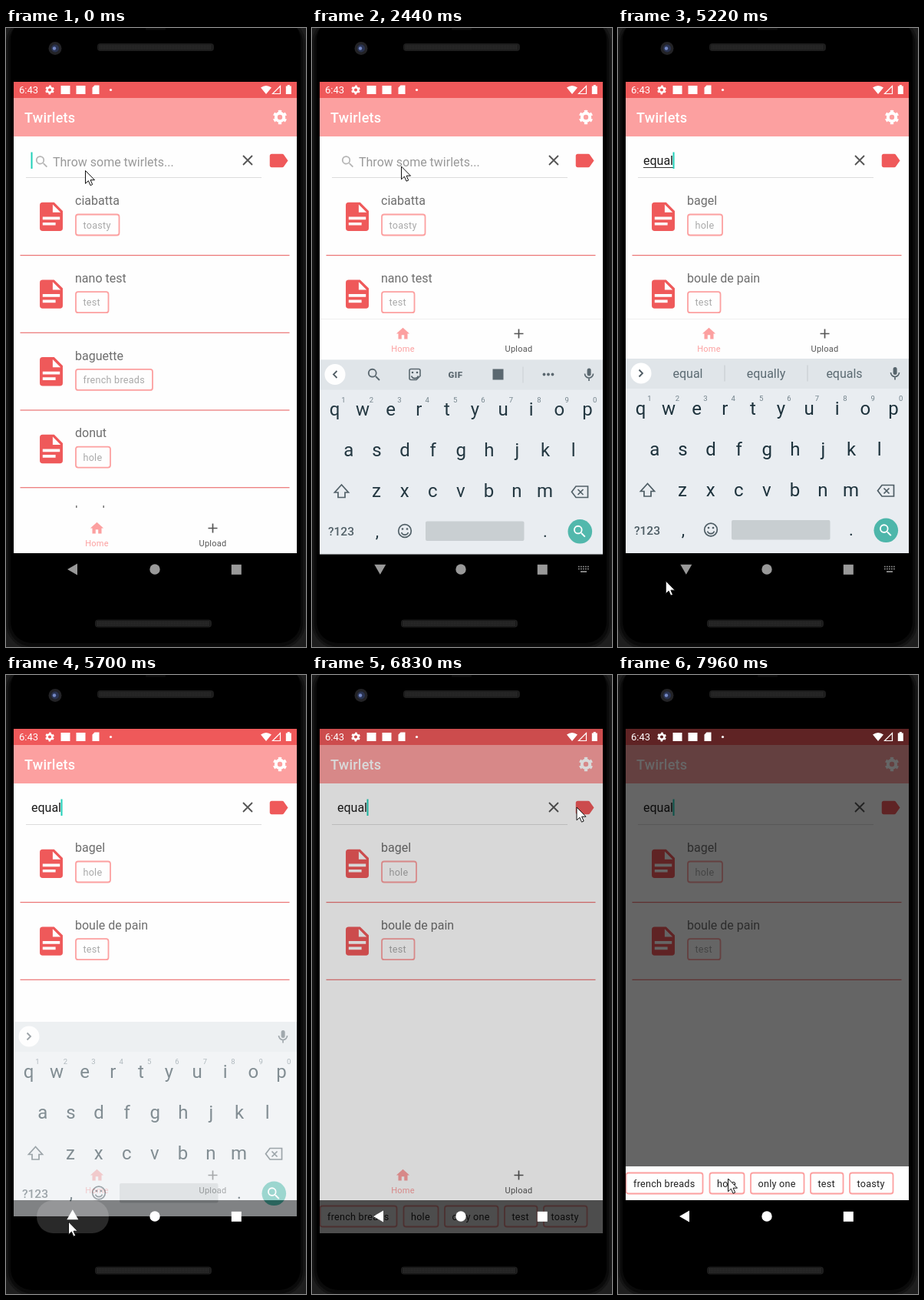
Write an HTML page that moves like this. It is 391 px wide and 805 px high and loops after 8 s.

```html
<!DOCTYPE html>
<html lang="en">
<head>
<meta charset="utf-8">
<title>Tag search on a phone</title>
<style>
  html, body { margin: 0; width: 100%; height: 100%; overflow: hidden; background: #000; }
  svg { display: block; width: 391px; height: 805px; font-family: Roboto, sans-serif; }
</style>
</head>
<body>
<svg id="stage" viewBox="0 0 391 805"></svg>
<script>
const RED = '#ef595a', PINK = '#fca0a0';
const LOOP = 8000;

const text = (x, y, size, fill, str, extra = '') =>
  `<text x="${x}" y="${y}" font-size="${size}" fill="${fill}" ${extra}>${str}</text>`;
const mid = (x, y, size, fill, str, extra = '') =>
  text(x, y, size, fill, str, `text-anchor="middle" ${extra}`);
const rect = (x, y, w, h, fill, extra = '') =>
  `<rect x="${x}" y="${y}" width="${w}" height="${h}" fill="${fill}" ${extra}/>`;
const circle = (x, y, r, fill, extra = '') =>
  `<circle cx="${x}" cy="${y}" r="${r}" fill="${fill}" ${extra}/>`;
const line = (d, color, width = 1.7, extra = '') =>
  `<path d="${d}" fill="none" stroke="${color}" stroke-width="${width}" ${extra}/>`;
// 24-unit icon centred on x, y
const icon = (d, x, y, scale, fill) =>
  `<path d="${d}" fill="${fill}" transform="translate(${x} ${y}) scale(${scale}) translate(-12 -12)"/>`;

const DOC = 'M13 9h5.5L13 3.5zM6 2h8l6 6v12a2 2 0 0 1-2 2H6a2 2 0 0 1-2-2V4a2 2 0 0 1 2-2m9 16v-2H6v2zm3-4v-2H6v2z';
const LENS = 'M15.5 14h-.8l-.3-.3A6.5 6.5 0 1 0 13.7 14.4l.3.3v.8l5 5 1.5-1.5zM9.5 14a4.5 4.5 0 1 1 0-9 4.5 4.5 0 0 1 0 9z';
const LABEL = 'M17.6 5.8C17.3 5.3 16.7 5 16 5H5C3.9 5 3 5.9 3 7v10c0 1.1.9 2 2 2h11c.7 0 1.3-.3 1.6-.8L22 12z';
const HOME = 'M10 20v-6h4v6h5v-8h3L12 3 2 12h3v8z';

const gear = (x, y, s) => `<g transform="translate(${x} ${y}) scale(${s})" fill="none" stroke="#fff">
  <circle r="5.2" stroke-width="4"/>
  <circle r="7.8" stroke-width="2.8" pathLength="12" stroke-dasharray="1 1" transform="rotate(15)"/></g>`;

const chip = (x, y, w, str, color) =>
  rect(x + 1, y + 1, w - 2, 27, 'none', `rx="3" stroke="${PINK}" stroke-width="1.8"`) +
  text(x + 10.5, y + 19, 12.6, color, str, 'letter-spacing=".25"');

const rows = items => items.map(([name, tag, w], i) => {
  const y = i * 100.7;
  return icon(DOC, 59, 245.4 + y, 1.87, RED) + text(90, 230.3 + y, 16, '#6e6e6e', name) +
    chip(90, 241.5 + y, w, tag, '#a9a9a9') + rect(18.5, 295 + y, 351, 1.2, '#ec7474');
}).join('');

const mic = rect(358.6, 441, 5, 10, '#56646c', 'rx="2.5"') +
  line('M355.5 448a5.5 5.5 0 0 0 11 0M361 453.5v4', '#56646c');
const smile = (x, y) => circle(x - 3, y - 2.5, 1.3, '#4d5c64') + circle(x + 3, y - 2.5, 1.3, '#4d5c64') +
  line(`M${x - 4.5} ${y + 2}a4.8 4.8 0 0 0 9 0`, '#4d5c64', 1.6);

const keyRow = (letters, x, y) => [...letters].map((c, i) => mid(x + i * 36.6, y, 24, '#1d323c', c)).join('');

const keyboard = () =>
  rect(10, 430, 369, 253, '#e9edf1') + rect(10, 430, 369, 39, '#e0e5e9') +
  '<g id="strip"></g>' + circle(30, 449, 13.5, '#fff') +
  line('M27.5 444.5l4.5 4.5-4.5 4.5', '#4d5a62', 1.8, 'id="chevron"') + mic +
  keyRow('qwertyuiop', 29.5, 502.5) + keyRow('asdfghjkl', 47.8, 555.5) + keyRow('zxcvbnm', 84, 608.5) +
  [...'1234567890'].map((d, i) => mid(41 + i * 36.4, 485, 9.5, '#71818a', d)).join('') +
  line('M38.5 592.5l-9 10h4.5v6.5h9v-6.5h4.5z', '#4d5c64') +
  line('M344 594.5h15.5v14.5h-15.5l-5.5-7.3zM346.5 598.5l7 7M353.5 598.5l-7 7', '#4d5c64') +
  text(21, 658.5, 15.5, '#4d5c64', '?123', 'font-weight="500"') +
  mid(85, 660, 22, '#1d323c', ',') + mid(304, 660, 22, '#1d323c', '.') +
  circle(121, 652.5, 8.3, 'none', 'stroke="#4d5c64" stroke-width="1.7"') + smile(121, 652.5) +
  rect(148, 640, 128.5, 25.5, '#c8ced1', 'rx="2"') +
  circle(349.3, 653.3, 15.8, '#4db6aa') + icon(LENS, 349, 653.3, 0.88, '#fff');

const toolStrip = icon(LENS, 81, 449.5, 0.9, '#56646c') +
  line('M129 442h10q2 0 2 2v7l-5 5h-7q-2 0-2-2v-10q0-2 2-2z', '#56646c', 1.6) + smile(134, 449) +
  mid(187, 453, 11.5, '#56646c', 'GIF', 'font-weight="900" letter-spacing=".5"') +
  rect(235.5, 442, 14, 14, '#56646c') + rect(274.5, 439, 1, 21, '#c8ced2') +
  [302.5, 308, 313.5].map(x => circle(x, 449, 1.9, '#56646c')).join('');

const wordStrip = words => words.map((w, i) => mid(91 + 102 * i, 455, 16, '#5b6a72', w)).join('') +
  rect(138.5, 438.5, 1, 21, '#c3cace') + rect(246.5, 438.5, 1, 21, '#c3cace');

const speaker = (x, y) => rect(x, y, 152, 10, '#1d1d1d', 'rx="4"') +
  [3, 5, 7].map(d => line(`M${x + 3} ${y + d}h146`, '#3b3b3b', 1, 'stroke-dasharray="1 1"')).join('');

const statusIcons = text(17, 85.3, 13, '#fff', '6:43') + gear(57, 80.5, 0.64) +
  rect(71.5, 75, 12, 11, '#fff') + rect(91.5, 75, 12, 11, '#fff') +
  '<path d="M115.5 74.5h6v11.5h-9v-8.5zM332 77.5q7-5 14 0l-7 8.5zM364.8 75.5h2v-1.5h3v1.5h2v10.5h-7z" fill="#fff"/>' +
  line('M357.5 75.5v10h-10z', '#fff', 1.2) + circle(136.5, 80.5, 1.6, '#fff');

document.getElementById('stage').innerHTML = `
  <clipPath id="screen"><rect x="10" y="70" width="369" height="613"/></clipPath>
  <clipPath id="panel"><rect x="10" y="70" width="369" height="656"/></clipPath>
  ${rect(0, 0, 391, 805, '#1e1e1e')}
  ${rect(1.5, -12, 387, 818, '#0a0a0a', 'rx="32" stroke="#141414" stroke-width="3"')}
  ${rect(6, -12, 378, 812, '#000', 'rx="28"')}
  ${rect(182, 0, 26, 2.5, '#0c0c0c', 'rx="1"')}
  ${circle(64, 26.5, 8.5, '#232326')}${circle(64, 26.5, 5, '#2a3350')}${circle(63, 26.5, 2.2, '#7488c4')}
  ${speaker(119, 20)}${speaker(116, 769.5)}
  <g clip-path="url(#screen)">
    ${rect(10, 70, 369, 613, '#fefefe')}${rect(10, 70, 369, 21, RED)}${rect(10, 91, 369, 50, PINK)}
    ${text(24, 123.3, 18, '#fff', 'Twirlets', 'font-weight="500" letter-spacing=".25"')}${gear(357, 116, 1)}
    <g id="hint">${icon(LENS, 46.7, 174, 0.86, '#b5b5b5')}${text(61, 179.7, 16, '#999', 'Throw some twirlets...')}</g>
    ${text(33, 178.3, 16, '#1c1c1c', '', 'id="query"')}
    ${rect(33, 181, 0, 1, '#333', 'id="underline"')}
    ${rect(32.5, 161.5, 2, 21.5, '#1fcfb8', 'id="caret"')}
    ${line('M309 166l12 12M321 166l-12 12', '#555', 1.8)}
    ${icon(LABEL, 355, 172.6, 1.25, RED)}
    ${rect(26, 194, 307, 1, '#dcdcdc')}
    <g id="all">${rows([['ciabatta', 'toasty', 58.5], ['nano test', 'test', 44.5],
      ['baguette', 'french breads', 102], ['donut', 'hole', 47], ['bagel', 'hole', 47]])}</g>
    <g id="found">${rows([['bagel', 'hole', 47], ['boule de pain', 'test', 44.5]])}</g>
    <g id="tabs">${rect(10, 624, 369, 320, '#fefefe')}${rect(10, 631, 369, 1, '#efefef', 'id="edge"')}
      ${icon(HOME, 118.5, 650.5, 0.86, PINK)}${mid(118.5, 674, 11, PINK, 'Home', 'letter-spacing=".25"')}
      ${line('M263.5 650.5h12M269.5 644.5v12', '#555')}${mid(269.5, 674, 11, '#555', 'Upload', 'letter-spacing=".25"')}
    </g>
    ${rect(10, 70, 369, 613, '#000', 'id="dim"')}
    ${statusIcons}
  </g>
  <g clip-path="url(#panel)">
    <g id="keys">${keyboard()}</g>
    <g id="sheet">${rect(10, 639, 369, 44, '#fefefe')}
      ${[[9.5, 102, 'french breads'], [118.5, 47, 'hole'], [172, 71.5, 'only one'], [250, 44.5, 'test'], [301, 58.5, 'toasty']]
        .map(([x, w, s]) => chip(x, 646.5, w, s, '#222')).join('')}</g>
  </g>
  ${rect(40, 683, 94, 43, '#fff', 'id="ripple" rx="21.5"')}
  <g id="system">
    <path id="back" d="M80 704l13-7.5v15z"/>
    <circle cx="194" cy="704" r="6.7"/><rect x="293.8" y="697.8" width="13" height="13"/>
  </g>
  <g id="switch">${[700.5, 703.5].map(y => line(`M347 ${y}h14`, '#999', 1.7, 'stroke-dasharray="1.7 1.3"')).join('')}
    ${line('M350 707h8', '#999', 1.7)}</g>
  <path id="mouse" d="M0 0v16.8l3.9-3.6 2.6 6 2.7-1.2-2.6-5.800h5.400z" fill="#fff" stroke="#111" stroke-linejoin="round"/>`;

const $ = id => document.getElementById(id);
const set = (id, attrs) => { for (const k in attrs) $(id).setAttribute(k, attrs[k]); };
const show = (id, on) => set(id, { visibility: on ? 'visible' : 'hidden' });
// value of the latest [time, ...values] entry
const hold = (t, list) => list.filter(e => e[0] <= t).pop().slice(1);

const TYPED = [
  [0, '', 0, []],
  [2960, 'e', 8.5, ['e', 'even', 'every']],
  [3220, 'eq', 17.6, ['eq', 'equal', 'equipment']],
  [3470, 'equ', 26.4, ['equ', 'equal', 'equity']],
  [3780, 'equa', 35.1, ['equa', 'equal', 'equally']],
  [4030, 'equal', 39, ['equal', 'equally', 'equals']]
];
const CARET = [[0, 1], [500, 0], [1000, 1], [1530, 0], [1930, 1], [2440, 0], [2960, 1], [4450, 0], [4980, 1]];
// keyboard offset and opacity
const SLIDE = [[0, 0, 0], [2200, 26, 0.3], [2320, 8, 0.8], [2440, 1.5, 0.97], [2560, 0, 1], [5700, 21, 0.55], [5820, 0, 0]];
const BACK = [[0, 0], [2200, -30], [2320, -65], [2440, -90], [5700, 90], [5820, 0]];
const RIPPLE = [[0, 0], [5700, 0.16], [5820, 0.12], [5980, 0.06], [6100, 0]];
// dim opacity, sheet offset, sheet opacity
const SHEET = [[0, 0, 0, 0], [6830, 0.15, 43, 0.3], [6950, 0.46, 4, 1], [7070, 0.6, 0, 1]];
// start, steps, from, bend, to
const MOVES = [
  [4860, 7, [116, 180], [30, 900], [81.5, 711]],
  [5980, 6, [81.5, 711], [480, 210], [345, 172]],
  [7210, 6, [345, 172], [240, 430], [143.5, 655]]
];

function mouseAt(t) {
  if (t < 4860) return hold(t, [[0, 103.5, 185.5], [1930, 128, 184], [2080, 116.5, 180]]);
  const [start, n, a, b, c] = MOVES.filter(m => m[0] <= t).pop();
  const p = Math.min(1, (Math.floor((t - start) / 120) + 1) / n);
  const u = p * p * (3 - 2 * p), v = 1 - u;
  return [0, 1].map(i => v * v * a[i] + 2 * u * v * b[i] + u * u * c[i]);
}

let stripNow = null;
function draw(t) {
  const [query, width, words] = hold(t, TYPED);
  const [offset, alpha] = hold(t, SLIDE);
  const [dim, drop, sheetAlpha] = hold(t, SHEET);
  const composing = t < 5580, raised = t >= 2320 && t < 5700;

  $('query').textContent = query;
  show('hint', !query);
  set('underline', { width: composing ? width : 0 });
  set('caret', { x: 32.5 + width, opacity: hold(t, CARET)[0] });
  show('all', t < 3220);
  show('found', t >= 3220);
  set('tabs', { transform: `translate(0 ${raised ? -253 : 0})` });
  show('edge', raised);

  const strip = !composing ? '' : query ? wordStrip(words) : toolStrip;
  if (strip !== stripNow) $('strip').innerHTML = stripNow = strip;
  set('chevron', { transform: query ? '' : 'rotate(180 30 449)' });
  set('keys', { transform: `translate(0 ${offset})`, opacity: alpha });

  set('dim', { opacity: dim });
  set('sheet', { transform: `translate(0 ${drop})`, opacity: sheetAlpha });
  set('ripple', { opacity: hold(t, RIPPLE)[0] });
  set('system', { fill: t < 5700 ? '#999' : '#fff' });
  set('back', { transform: `rotate(${hold(t, BACK)[0]} 87.8 703)` });
  show('switch', t >= 2440 && t < 5700);
  set('mouse', { transform: `translate(${mouseAt(t)})` });
}

function tick() {
  draw(performance.now() % LOOP);
  requestAnimationFrame(tick);
}
tick();
</script>
</body>
</html>
```
